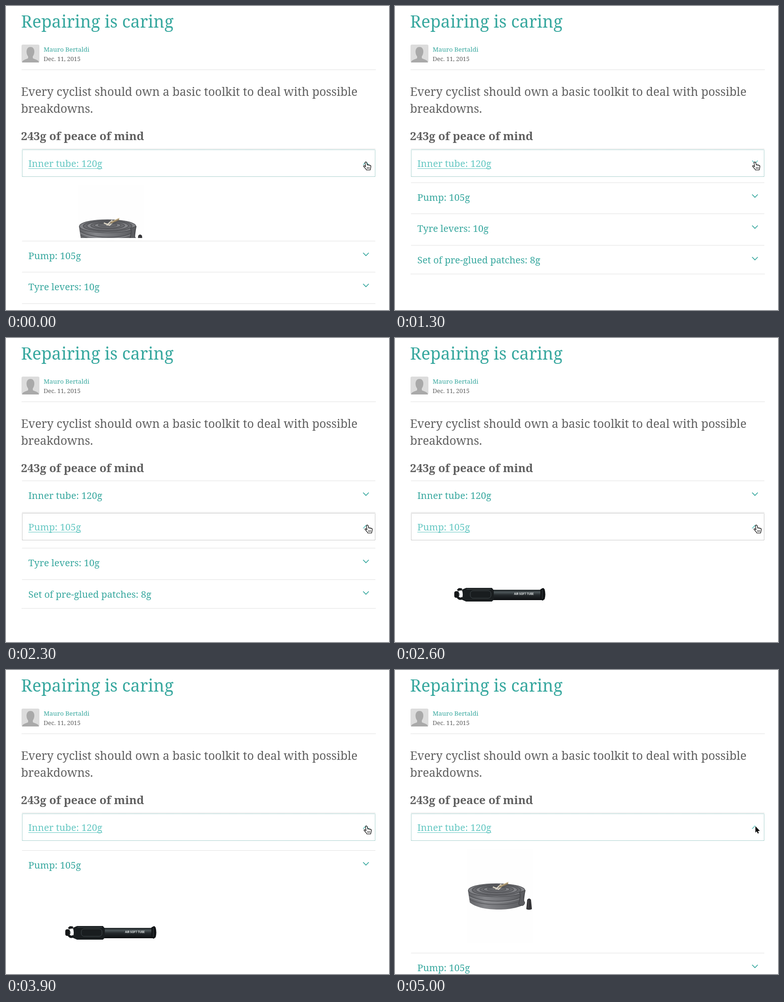
Recreate the animation shown at these times as an HTML page. Size 814 by 646 pixels, loop 5.1 s.

```html
<!DOCTYPE html>
<html lang="en">
<head>
<meta charset="utf-8">
<title>Repairing is caring</title>
<style>
  html, body { margin: 0; width: 100%; height: 100%; overflow: hidden; background: #fff; }
  svg { display: block; }
  text { font-family: "Noto Serif", serif; font-weight: 300; fill: #606060; white-space: pre; }
  .teal { fill: #38a89f; }
  .rule { stroke: #e3e3e3; }
  .label { font-size: 20.1px; fill: #38a89f; }
  .chevron { fill: none; stroke: #38a89f; stroke-width: 1.7; }
  .underline { stroke: #66c8c3; visibility: hidden; }
  .outline { fill: none; stroke: #999; stroke-dasharray: 1 1; stroke-dashoffset: .5; visibility: hidden; }
  .active .label { fill: #66c8c3; }
  .active .chevron { stroke: #66c8c3; }
  .active .underline, .focus .outline { visibility: visible; }
</style>
</head>
<body>
<svg id="stage" width="814" height="646" viewBox="0 0 814 646">
  <defs>
    <linearGradient id="rubber">
      <stop offset="0" stop-color="#626367"/><stop offset=".3" stop-color="#85868a"/>
      <stop offset=".65" stop-color="#707175"/><stop offset="1" stop-color="#57585c"/>
    </linearGradient>
    <linearGradient id="barrel" x2="0" y2="1">
      <stop offset="0" stop-color="#1b2022"/><stop offset=".25" stop-color="#4c5558"/>
      <stop offset=".5" stop-color="#24292c"/><stop offset="1" stop-color="#0d0f11"/>
    </linearGradient>
  </defs>

  <text class="teal" x="32" y="46" font-size="36.1" style="font-weight:500">Repairing is caring</text>
  <rect x="33" y="82" width="38" height="38" rx="3" fill="#dcdcdc"/>
  <path d="M34 120C35 114 42 114 47 111V107C42 101 42 87 52 87S62 101 57 107V111C62 114 69 114 70 120Z" fill="#a9a9a9"/>
  <text class="teal" x="80" y="97" font-size="13.4">Mauro Bertaldi</text>
  <text x="80" y="117" font-size="12.8">Dec. 11, 2015</text>
  <path class="rule" d="M33 135.5H786"/>
  <text x="32" y="191" font-size="24.9">Every cyclist should own a basic toolkit to deal with possible</text>
  <text x="32" y="227" font-size="24.9">breakdowns.</text>
  <text x="32" y="285" font-size="24" style="font-weight:700">243g of peace of mind</text>

  <svg id="tube" width="814" height="0">
    <g transform="translate(0 -364)">
      <rect x="154" y="380" width="139" height="200" fill="#fefefe"/>
      <path d="M155 468L159 494C172 505 196 509 220 509C244 509 262 505 273 499L277 468Z" fill="url(#rubber)"/>
      <path d="M157 478C180 494 245 496 272 480M158 487C185 502 245 502 272 489" fill="none" stroke="#505155" stroke-width="1.2"/>
      <path d="M158 482C185 497 240 498 270 484" fill="none" stroke="#9c9da1"/>
      <g id="coils"></g>
      <path d="M264 473Q268 476 265 487L263 498Q274 505 276 494Q270 488 277 468Z" fill="#5c5d61" stroke="#3b3c3f"/>
      <path d="M208 461L220 466L229 457M214 466L226 455" fill="none" stroke="#d9d3c4" stroke-width="2.6"/>
      <path d="M222 461L240 453" stroke="#8e7c5c" stroke-width="4"/>
      <path d="M224 459L241 451" stroke="#cbb891" stroke-width="1.5"/>
      <path d="M281 488Q285 483 289 488L291 508Q285 511 279 508Z" fill="#343437"/>
      <path d="M284 489L283 506" stroke="#5a5a5e"/>
    </g>
  </svg>

  <svg id="pump" width="814" height="0">
    <g transform="translate(0 -431)">
      <path d="M134 537Q136 532 142 535M133 550Q138 557 144 552" fill="none" stroke="#15181a" stroke-width="5"/>
      <rect x="126" y="538" width="10" height="14" rx="4" fill="#15181a"/>
      <path d="M134 540Q141 545 134 550" fill="none" stroke="#555c5f"/>
      <rect x="205" y="535" width="108" height="22" fill="url(#barrel)"/>
      <path d="M142 535L151 531H206L210 536V556L206 560H151L142 556Q146 545 142 535Z" fill="#191d1f"/>
      <rect x="160" y="537" width="44" height="16" rx="6" fill="none" stroke="#40484b"/>
      <path d="M152 534H204" stroke="#444c4f"/>
      <path d="M309 534L315 531L318 534Q321 545 318 555L314 558L309 556Z" fill="#101315"/>
      <path d="M313 535V554" stroke="#41494c"/>
      <text x="253" y="545.5" style="font:bold 5.6px Inter,sans-serif;fill:#e8ecec">AIR SOFT TUBE</text>
    </g>
  </svg>

  <g id="rows"></g>
  <path id="bottom" class="rule" d="M33 .5H786"/>

  <g id="cursor" stroke-linejoin="round">
    <g id="hand">
      <path d="M-2 .5C-1.5-1 1-1 1.5 .5L3 6C4 5 5.5 5 6 6.5C7 5.5 8 5.8 8.5 7C9.5 6.2 10.5 7 10.5 8.5C10.5 12 9.5 13 9 16.5H1C0 13.5-3 11.5-4.8 9C-5.5 7.5-4 6.5-2.5 8L-.8 9.5Z" fill="#fff" stroke="#000" stroke-width="1.2"/>
      <path d="M2.6 10.5V14M4.8 10.5V14M7 10.5V14" stroke="#000" stroke-width=".9"/>
    </g>
    <path id="arrow" d="M0 0V13.5L3 10.8L5 15.5L7.2 14.6L5.2 10H9.5Z" stroke="#fff" stroke-width="1.2" paint-order="stroke"/>
  </g>
</svg>

<script>
const $ = id => document.getElementById(id);
const LOOP = 5100, STEP = 100, SLIDE = 400, PANEL = 231;
const CLOSE_TUBE = 938, OPEN_PUMP = 2247, OPEN_TUBE = 3840, LEAVE = 4900;
const tops = [303, 370, 436, 503, 564];
const labels = ['Inner tube: 120g', 'Pump: 105g', 'Tyre levers: 10g', 'Set of pre-glued patches: 8g'];
const DOWN = 'M759 25.5L765 31.5L771 25.5', UP = 'M759 34.5L765 28.5L771 34.5';

// time, x and y of the pointer tip
const route = [[0, 765, 332], [1500, 765, 332], [1850, 788, 362], [2150, 768, 398], [2900, 768, 398],
  [3300, 768, 388], [3400, 768, 385], [3700, 766, 332], [LOOP, 766, 332]];

$('coils').innerHTML = [0, 1, 2, 3, 4, 5].map(i =>
  `<ellipse cx="216" cy="${468 - i * .5}" rx="${60 - i * 8}" ry="${14 - i * 2.1}" fill="${i % 2 ? '#696a6e' : '#828387'}" stroke="#4a4b4f" stroke-width="1.2"/>`).join('');

$('rows').innerHTML = labels.map(label => `<g>
  <path class="rule" d="M34 .5H785"/>
  <rect class="outline" x="34.5" y="2.5" width="750" height="57"/>
  <text class="label" x="47.5" y="39">${label}</text>
  <path class="underline"/>
  <path class="chevron"/></g>`).join('');

const rows = [...$('rows').children].map(group => ({
  group,
  label: group.querySelector('.label'),
  underline: group.querySelector('.underline'),
  chevron: group.querySelector('.chevron')
}));
rows[0].group.querySelector('.outline').style.stroke = '#62aaa5';

const clamp = v => Math.max(0, Math.min(1, v));
const swing = (t, start) => .5 - .5 * Math.cos(Math.PI * clamp((t - start) / SLIDE));
const show = (el, on) => el.setAttribute('visibility', on ? 'visible' : 'hidden');
const move = (el, x, y) => el.setAttribute('transform', `translate(${x} ${y})`);

function pointer(t) {
  const i = route.findIndex(p => p[0] > t);
  const [t0, x0, y0] = route[i - 1], [t1, x1, y1] = route[i];
  const k = (t - t0) / (t1 - t0), e = k * k * (3 - 2 * k);
  return [x0 + (x1 - x0) * e, y0 + (y1 - y0) * e];
}

function panel(el, y, height) {
  el.setAttribute('y', y);
  el.setAttribute('height', height);
  el.style.display = height > 0 ? '' : 'none';
}

function draw(t) {
  const tube = Math.round(PANEL * (swing(t, -215) - swing(t, CLOSE_TUBE) + swing(t, OPEN_TUBE)));
  const pump = Math.round(PANEL * (swing(t, OPEN_PUMP) - swing(t, OPEN_TUBE)));
  const shift = [0, tube, tube + pump, tube + pump, tube + pump];
  const pumpFocus = t >= OPEN_PUMP && t < OPEN_TUBE;
  const open = [t < CLOSE_TUBE || t >= OPEN_TUBE, pumpFocus];
  const [x, y] = pointer(t);
  const outside = x > 784;
  const hovered = outside ? -1 : y < 366 ? 0 : 1;
  const focused = pumpFocus ? 1 : 0;

  rows.forEach((row, i) => {
    move(row.group, 0, tops[i] + shift[i]);
    row.group.classList.toggle('active', i === hovered || i === focused);
    row.group.classList.toggle('focus', i === focused);
    row.underline.setAttribute('d', `M47.5 42.5h${row.label.getComputedTextLength()}`);
    row.chevron.setAttribute('d', open[i] ? UP : DOWN);
  });
  move($('bottom'), 0, tops[4] + shift[4]);
  panel($('tube'), tops[0] + 61, tube);
  panel($('pump'), tops[1] + 61 + tube, pump);

  const arrow = outside || t >= LEAVE;
  show($('arrow'), arrow);
  show($('hand'), !arrow);
  move($('cursor'), x, y);
}

const begin = performance.now();
function tick() {
  const t = (performance.now() - begin) % LOOP;
  draw(Math.floor(t / STEP) * STEP);
  requestAnimationFrame(tick);
}
tick();
</script>
</body>
</html>
```
